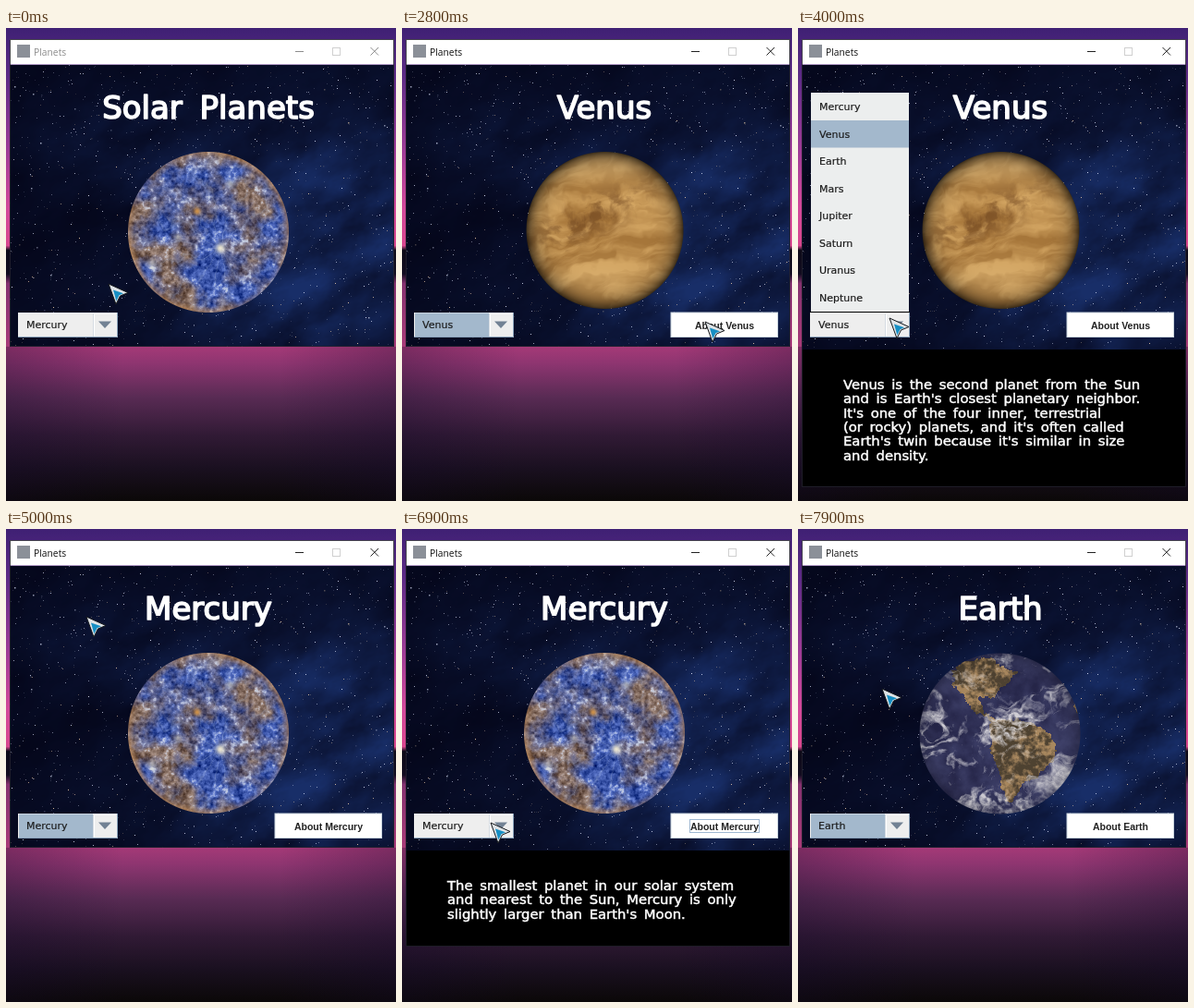
An HTML page with a canvas for the animation above (8 s loop, 422x512 px).

```html
<!DOCTYPE html>
<html lang="en">
<head>
<meta charset="utf-8">
<title>Planets</title>
<style>
html, body { margin: 0; width: 100%; height: 100%; overflow: hidden; background: #060506; }
canvas, svg { position: absolute; left: 0; top: 0; }
.wide { font-family: "DejaVu Sans", sans-serif; }
#title { font-size: 34px; fill: #fff; stroke: #fff; stroke-width: 1.7px; stroke-linejoin: round; }
#about { font-size: 14.8px; fill: #fff; stroke: #fff; stroke-width: .5px; word-spacing: 3px; }
.item { font-size: 11px; fill: #1c1c1c; stroke: #1c1c1c; stroke-width: .2px; }
#label { font: bold 10.5px "Liberation Sans", Arial, sans-serif; fill: #222; }
#caption { font: 10.3px "Open Sans", sans-serif; }
</style>
</head>
<body>
<canvas id="desk" width="422" height="512"></canvas>
<canvas id="sky" width="422" height="512"></canvas>
<svg id="ui" width="422" height="512" viewBox="0 0 422 512">
  <rect id="panel" x="4" y="348" width="416" fill="#000"/>
  <rect x="4" y="12" width="416" height="27.500" fill="#fff"/>
  <rect id="frame" x="4.5" y="12.5" width="415" fill="none" stroke="#24212e" stroke-opacity=".85"/>
  <rect x="12" y="18" width="14" height="14" fill="#8b9098"/>
  <text id="caption" x="30" y="29.5">Planets</text>
  <g id="controls" fill="none">
    <path d="M313 25.5h9M394.5 21l8.5 8.5M403 21l-8.5 8.5"/>
    <rect x="353.5" y="21.5" width="8" height="8" stroke="#d0d0d0"/>
  </g>
  <text id="title" class="wide" x="219" y="98" text-anchor="middle"></text>
  <g id="button">
    <rect x="291" y="308" width="115.5" height="26.5" fill="#fff" stroke="#c9d3dd"/>
    <rect id="focus" y="314.5" height="14" fill="none" stroke="#9fb8d2"/>
    <text id="label" x="349" y="326" text-anchor="middle"></text>
  </g>
  <g id="combo">
    <rect x="13" y="308" width="108" height="27" fill="#eee"/>
    <rect id="filled" x="14" y="308.5" width="80" height="26" fill="#a3b8cc"/>
    <path d="M94.5 309v25" stroke="#d5dbe1"/>
    <path d="M13 334.5H120.5V308" fill="none" stroke="#8aa2ba"/>
    <path d="M95.5 333.5V309.5H119" fill="none" stroke="#fff"/>
    <path d="M100 317.5h14l-7 7.5z" fill="#728294"/>
    <text id="chosen" class="wide item" x="22" y="325"></text>
  </g>
  <g id="popup">
    <rect x="14" y="70" width="106" height="237" fill="#eceeee"/>
    <rect id="mark" x="14" width="106" height="29.5" fill="#a3b8cc"/>
    <path d="M13 307.5h108" stroke="#000"/>
  </g>
  <g id="about" class="wide"></g>
  <g id="cursor" stroke-linejoin="round">
    <path d="M0 0L21 9.5L12.5 13L8 22Z" fill="#dfe3e6" stroke="#15181c"/>
    <path d="M5 6.5L16 10.3L11.5 12.3L8.3 18.5Z" fill="#168fc4"/>
  </g>
</svg>
<script>
const LOOP = 8000, STEP = 100, ROW = 29.5, POPUP_TOP = 70;
const planets = ["Mercury", "Venus", "Earth", "Mars", "Jupiter", "Saturn", "Uranus", "Neptune"];
const facts = {
  Venus: ["Venus is the second planet from the Sun", "and is Earth's closest planetary neighbor.",
    "It's one of the four inner, terrestrial", "(or rocky) planets, and it's often called",
    "Earth's twin because it's similar in size", "and density."],
  Mercury: ["The smallest planet in our solar system", "and nearest to the Sun, Mercury is only",
    "slightly larger than Earth's Moon."]
};
const scenes = [
  { at: 0, planet: "Mercury", title: "Solar Planets", idle: true },
  { at: 1300, planet: "Mercury", title: "Solar Planets", popup: true },
  { at: 2200, planet: "Venus", focus: "combo" },
  { at: 3000, planet: "Venus", focus: "button", open: 497 },
  { at: 4000, planet: "Venus", popup: true, open: 497 },
  { at: 5000, planet: "Mercury", focus: "combo" },
  { at: 5900, planet: "Mercury", focus: "button", open: 452 },
  { at: 7100, planet: "Mercury", popup: true, open: 452 },
  { at: 7800, planet: "Earth", focus: "combo" }
];
const path = [
  [0, 111, 277], [900, 111, 277], [1100, 97, 316], [1400, 97, 316], [2000, 79, 112], [2200, 79, 112],
  [2800, 328, 318], [3100, 328, 318], [3900, 99, 314], [4200, 99, 314], [4600, 87, 95],
  [5000, 87, 95], [5800, 328, 318], [6300, 328, 318], [6900, 96, 318], [7100, 96, 318],
  [7600, 90, 146], [7700, 90, 146], [7900, 91, 173]
];

const $ = id => document.getElementById(id);
const clamp = (v, lo = 0, hi = 1) => Math.min(hi, Math.max(lo, v));
const lerp = (a, b, k) => a + (b - a) * k;
const mix = (a, b, k) => a.map((v, i) => lerp(v, b[i], clamp(k)));
const smooth = k => k * k * (3 - 2 * k);
const blob = (x, y, cx, cy, rx, ry = rx) => Math.exp(-(((x - cx) / rx) ** 2) - ((y - cy) / ry) ** 2);

function hash(x, y) {
  const n = Math.sin(x * 127.1 + y * 311.7) * 43758.5453;
  return n - Math.floor(n);
}
function noise(x, y) {
  const i = Math.floor(x), j = Math.floor(y), u = smooth(x - i), v = smooth(y - j);
  return lerp(lerp(hash(i, j), hash(i + 1, j), u), lerp(hash(i, j + 1), hash(i + 1, j + 1), u), v);
}
// Each octave is rotated so that the lattice does not show.
function fbm(x, y, octaves = 4) {
  let sum = 0, amp = .5, total = 0;
  for (let o = 0; o < octaves; o++, amp /= 2) {
    sum += amp * noise(x, y);
    total += amp;
    [x, y] = [x * 1.6 - y * 1.2 + 17, x * 1.2 + y * 1.6 + 5];
  }
  return sum / total;
}
function paint(ctx, x0, y0, w, h, shade) {
  const img = ctx.createImageData(w, h);
  for (let y = 0; y < h; y++)
    for (let x = 0; x < w; x++) img.data.set(shade(x0 + x, y0 + y), (y * w + x) * 4);
  ctx.putImageData(img, x0, y0);
}

function drawDesk() {
  const ctx = $("desk").getContext("2d");
  const fill = (gradient, stops, top) => {
    stops.forEach(([at, color]) => gradient.addColorStop(at, color));
    ctx.fillStyle = gradient;
    ctx.fillRect(0, top, 422, 512 - top);
  };
  fill(ctx.createLinearGradient(0, 0, 0, 512), [
    [0, "#3f2074"], [.1, "#5c2a86"], [.25, "#9a3a96"], [.38, "#d2489a"], [.46, "#d8468e"],
    [.47, "#0d0a18"], [.52, "#120c20"], [.54, "#84316f"], [.67, "#a73a78"], [.71, "#8d3570"],
    [.78, "#592b54"], [.86, "#311a35"], [.93, "#1a1020"], [1, "#0b0808"]], 0);
  const dim = "rgba(20,8,40,.28)", clear = "rgba(20,8,40,0)";
  fill(ctx.createLinearGradient(0, 0, 422, 0), [[0, dim], [.3, clear], [.7, clear], [1, dim]], 345);
}

function drawSky() {
  const ctx = $("sky").getContext("2d");
  paint(ctx, 4, 40, 416, 308, (x, y) => {
    const haze = .75 * blob(x, y, 370, 190, 130, 95) + .6 * blob(x, y, 290, 310, 130, 80)
      + .38 * blob(x, y, 140, 135, 95, 50) + .12;
    const d = clamp(haze * (fbm(x / 48 + y / 90, y / 40, 5) * 1.5 + .1));
    return [...mix([3, 4, 22], [24, 46, 104], d), 255];
  });
  for (let i = 0; i < 1300; i++) {
    const bright = hash(i, 3) ** 3, size = i % 28 ? 1 : 1.5;
    ctx.fillStyle = `rgba(${i % 5 ? "215,222,245" : "235,205,170"},${.15 + .8 * bright})`;
    ctx.fillRect(4 + Math.floor(hash(i, 1) * 415), 40 + Math.floor(hash(i, 2) * 307), size, size);
  }
}

function mercury(u, v) {
  const big = fbm(u * 4 + 8, v * 4 + 4, 5), mid = fbm(u * 10 + 3, v * 10), fine = fbm(u * 27, v * 27, 3);
  const blue = .52 + (big - .5) * 2.4 + .3 * blob(u, v, .4, .5, .5) + .2 * blob(u, v, -.2, -.15, .4)
    - .4 * blob(u, v, -.4, -.75, .4) - .35 * blob(u, v, .6, -.5, .35) - .3 * blob(u, v, -.5, .7, .35);
  let c = mix([132, 108, 96], [62, 88, 172], blue);
  c = c.map(k => k + (mid - .5) * 90 + (fine - .5) * 130);
  c = mix(c, [200, 208, 225], (fine - .64) * 3 + (mid - .62) * 3);
  const ray = Math.abs(Math.sin(Math.atan2(v - .2, u - .15) * 7 + big * 5));
  c = mix(c, [180, 195, 225], (1 - ray) ** 5 * .3);
  c = mix(c, [235, 230, 210], blob(u, v, .15, .2, .06) + .6 * blob(u, v, .27, -.6, .05)
    + .5 * blob(u, v, -.38, .06, .04) + .5 * blob(u, v, -.7, .4, .06));
  c = mix(c, [205, 145, 75], blob(u, v, -.14, -.26, .045));
  const rim = clamp((Math.hypot(u, v) - .92) * 12);
  return mix(c, [186, 130, 76], rim * clamp(.1 + Math.abs(u - v) * .45));
}

function venus(u, v) {
  const warp = fbm(u * 2 + 4, v * 2 + 9);
  const streak = fbm(u * 2.2 - v + warp * 2, v * 7 + u * 2.5 + warp * 4);
  const mottle = fbm(u * 8 + 5, v * 9 + warp * 3);
  const dark = blob(u, v + u * .45, -.2, -.25, .75, .27);
  let c = mix([166, 118, 58], [210, 164, 97], .5 + (streak - .5) * 2.6);
  c = mix(c, [112, 70, 32], dark * clamp(.4 + (mottle - .5) * 4) * .7);
  c = mix(c, [226, 188, 126], .55 * blob(u, v, .05, -.85, .7, .25) + .35 * blob(u, v, -.1, .65, .55, .25));
  const shade = 1 - .7 * Math.hypot(u, v) ** 9;
  return c.map(k => k * shade);
}

const land = new Path2D(
  "M163 152L180 142L207 139L225 150L236 153L226 164L215 172L214 183L206 181L196 184L200 197L213 205L210 209L189 197L180 180L168 168Z" +
  "M208 206L238 205L262 214L282 232L277 250L258 266L243 275L232 293L225 297L221 275L210 245Z" +
  "M290 160L312 175L312 225L303 208Z");
function earth(u, v, x, y, ctx) {
  const warp = fbm(u * 2.5 + 2, v * 2.5), rough = fbm(u * 9, v * 9, 5) - .5, fine = fbm(u * 24, v * 24, 3) - .5;
  const flow = fbm(u * 3 + warp * 4, v * 5 + warp * 5 + u * 1.5, 5);
  const wisp = 1 - Math.abs(fbm(u * 3 + warp * 5 + 6, v * 4.5 - u + warp * 4, 5) * 2 - 1) * 5;
  let c = ctx.isPointInPath(land, x + rough * 12, y + fine * 8)
    ? mix([76, 64, 48], [164, 132, 92], .5 + rough * 2 + fine * 2 - .6 * blob(u, v, .2, .1, .3))
    : mix([36, 36, 70], [62, 64, 104], warp + rough);
  const cover = .9 * blob(u, v, .17, -.05, .35, .2) + .5 * blob(u, v, -.6, .35, .5, .4)
    + .6 * blob(u, v, -.1, .88, .8, .2) + .45 * blob(u, v, .15, -.85, .6, .18) + .3 * blob(u, v, -.7, -.2, .4);
  const cloud = (flow - .57 + cover * .14) * 3 + clamp(wisp) * (.2 + cover * .35) + fine * (.4 + cover);
  c = mix(c, [216, 214, 218], clamp(cloud, 0, .92));
  const shade = 1.03 - .2 * Math.hypot(u, v) ** 8;
  return c.map(k => k * shade);
}

function globe(name, cx, cy, r, texture) {
  const canvas = document.createElement("canvas");
  canvas.width = 422;
  canvas.height = 348;
  const ctx = canvas.getContext("2d"), left = Math.floor(cx - r) - 1, top = Math.floor(cy - r) - 1;
  const size = Math.ceil(2 * r) + 3;
  paint(ctx, left, top, size, size, (x, y) => {
    const dx = x + .5 - cx, dy = y + .5 - cy, alpha = clamp(r - Math.hypot(dx, dy) + .5);
    return alpha ? [...texture(dx / r, dy / r, x, y, ctx), alpha * 255] : [0, 0, 0, 0];
  });
  document.body.insertBefore(canvas, $("ui"));
  return [name, canvas];
}

function addText(parent, text, x, y, className) {
  const node = document.createElementNS("http://www.w3.org/2000/svg", "text");
  node.textContent = text;
  node.setAttribute("x", x);
  node.setAttribute("y", y);
  if (className) node.setAttribute("class", className);
  parent.append(node);
}
const set = (id, values) => Object.entries(values).forEach(([k, v]) => $(id).setAttribute(k, v));
const show = (id, on) => { $(id).style.display = on ? "" : "none"; };

function pointer(t) {
  const next = path.findIndex(p => p[0] > t);
  if (next < 0) return path[path.length - 1].slice(1);
  const [t0, x0, y0] = path[next - 1], [t1, x1, y1] = path[next], k = smooth((t - t0) / (t1 - t0));
  return [lerp(x0, x1, k), lerp(y0, y1, k)];
}

function enter(scene) {
  const { planet, title, popup, focus, open, idle } = scene;
  globes.forEach(([name, canvas]) => { canvas.style.display = name === planet ? "" : "none"; });
  $("title").textContent = title || planet;
  $("title").style.wordSpacing = title ? "8px" : "0";
  $("chosen").textContent = planet;
  $("label").textContent = "About " + planet;
  const bottom = open || 345;
  $("sky").style.clipPath = `inset(0 0 ${512 - (open ? 348 : 345)}px 0)`;
  set("panel", { height: Math.max(0, bottom - 348) });
  set("frame", { height: bottom - 13 });
  set("caption", { fill: idle ? "#8c8c8c" : "#111" });
  set("controls", { stroke: idle ? "#8c8c8c" : "#222" });
  set("focus", { x: planet === "Venus" ? 315.5 : 311.5, width: planet === "Venus" ? 67 : 75 });
  show("button", !title);
  show("focus", focus === "button");
  show("filled", focus === "combo");
  show("popup", popup);
  $("about").replaceChildren();
  if (open) facts[planet].forEach((line, i) => addText($("about"), line, 49, 391 + i * 15.3));
}

let current;
function draw(now) {
  const t = Math.floor(now % LOOP / STEP) * STEP;
  const scene = scenes.filter(s => s.at <= t).pop();
  if (scene !== current) enter(current = scene);
  const [x, y] = pointer(t);
  set("cursor", { transform: `translate(${x.toFixed(1)} ${y.toFixed(1)})` });
  // The highlight trails the pointer by one step.
  const row = Math.floor((pointer(Math.max(0, t - STEP))[1] - POPUP_TOP) / ROW);
  const marked = row >= 0 && row < planets.length ? row : planets.indexOf(scene.planet);
  set("mark", { y: POPUP_TOP + marked * ROW + .5 });
}

drawDesk();
drawSky();
const globes = [
  globe("Mercury", 219, 221, 87, mercury),
  globe("Venus", 219.5, 219, 85, venus),
  globe("Earth", 218.5, 221.5, 87, earth)
];
planets.forEach((name, i) => addText($("popup"), name, 23, 89 + i * ROW, "wide item"));
const start = performance.now();
function tick() {
  draw(performance.now() - start);
  requestAnimationFrame(tick);
}
tick();
</script>
</body>
</html>
```
